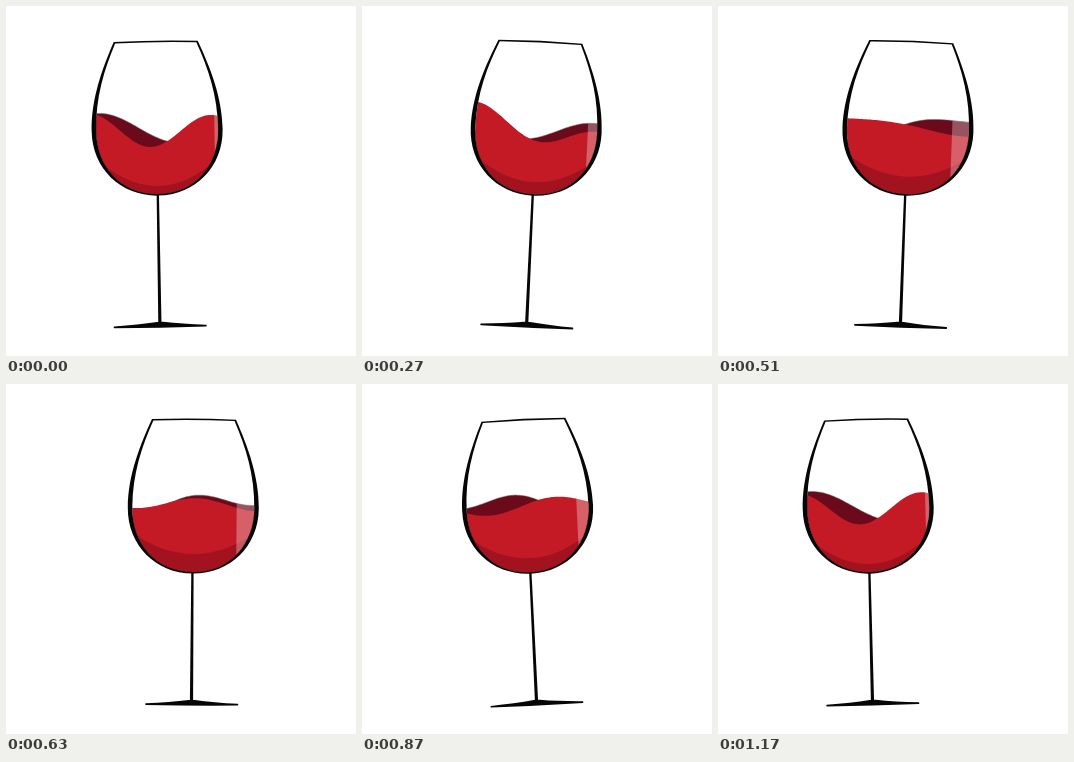
These frames come from a looping animation (350x350 px, 1200 ms). An HTML page:

```html
<!DOCTYPE html>
<html lang="en">
<head>
<meta charset="utf-8">
<title>Wine glass</title>
<style>
  html, body { margin: 0; width: 100%; height: 100%; overflow: hidden; background: #fff; }
  svg { display: block; width: 100vw; height: 100vh; }
</style>
</head>
<body>
<svg viewBox="0 0 350 350">
  <defs>
    <clipPath id="bowl"><path class="tilt" d="M-40.5-280C-52-254-61-227-61-193C-61-157-37-129-0-129C37-129 61-157 61-193C61-227 52-254 40.5-280Z"/></clipPath>
    <clipPath id="wine"><path class="back"/><path class="front"/></clipPath>
  </defs>
  <g clip-path="url(#bowl)">
    <path class="back" fill="#6a0a1b" stroke="#777" stroke-width=".5"/>
    <path class="front" fill="#c41a26"/>
    <g class="tilt"><path id="shade" fill="#a2131f"/></g>
    <g clip-path="url(#wine)">
      <g class="tilt"><path id="shine" fill="#fff" fill-opacity=".3"/></g>
    </g>
  </g>
  <g class="tilt" fill="#060607">
    <path fill-rule="evenodd" d="M-42-281.6C-54-255-65.5-225-65.5-193C-65.5-155-37-127.4 0-127.4C37-127.4 65.5-155 65.5-193C65.5-225 54-255 42-281.6Q0-283.4-42-281.6ZM-40.6-280.2Q0-281.8 40.6-280.2C52-254 61-227 61-193C61-157 37-129 0-129C-37-129-61-157-61-193C-61-227-52-254-40.6-280.2Z"/>
    <path d="M-1.5-129H.8L1.3 1H-1.9Z"/>
    <path d="M-46 2.7Q-22 1.4-3-1.1H3Q22 1.4 46 2.4Q47.3 3.3 46 4.2Q0 4.9-46 4.4Q-47.5 3.6-46 2.7Z"/>
  </g>
</svg>
<script>
const LOOP = 1200, STEP = 30, LEVEL = 100, REACH = 61;

const setAll = (s, name, value) =>
  document.querySelectorAll(s).forEach(el => el.setAttribute(name, value));

// Periodic value around a mean, highest at time `peak`
const sway = (t, mean, amp, peak) => mean + amp * Math.cos((t - peak) / LOOP * 2 * Math.PI);
const flutter = (t, amp) => sway(2 * t, 0, amp, 60);

// A surface is level + slope + hump + ripple, each swaying on its own
const frontWave = t => ({
  level: sway(t, 22.3, 2.4, 20),
  slope: sway(t, 3.5, 11, 325) - flutter(t, 1.5),
  hump: sway(t, 5.2, 11.5, 95),
  ripple: sway(t, -3.5, 3, 480)
});
const backWave = t => ({
  level: sway(t, 23, 4.5, 130),
  slope: sway(t, 1.5, 11, -80) + flutter(t, 2.5),
  hump: sway(t, -0.9, 8, 140),
  ripple: sway(t, 0.6, 3.2, 950)
});

function wavePath(wave, cx) {
  let d = '';
  for (let x = -70; x <= 70; x += 2) {
    const a = x / REACH * Math.PI;
    const y = LEVEL + wave.level + wave.slope * Math.sin(a / 2) +
      wave.hump * Math.cos(a) + wave.ripple * Math.sin(a);
    d += `${d ? 'L' : 'M'}${cx + x} ${y}`;
  }
  return `${d}V200H${cx - 70}Z`;
}

function draw(t) {
  const x = sway(t, 169.9, -15.9, 30);
  const tilt = sway(t, 0, 3.05, 358);
  const cx = x + 193 * Math.sin(tilt * Math.PI / 180);
  setAll('.tilt', 'transform', `translate(${x} 317) rotate(${tilt})`);
  setAll('.front', 'd', wavePath(frontWave(t), cx));
  setAll('.back', 'd', wavePath(backWave(t), cx));

  const low = sway(t, -142, 5, 5), rise = sway(t, 32, 4.5, 5);
  shade.setAttribute('d', `M-70 ${low - rise}Q0 ${low + rise} 70 ${low - rise}V-120H-70Z`);
  const edge = sway(t, 50.3, 7, 5);
  shine.setAttribute('d', `M${edge} -230H70V-130H${edge}Z`);
}

const start = performance.now();
function tick() {
  const t = (performance.now() - start) % LOOP;
  draw(Math.floor(t / STEP) * STEP);
  requestAnimationFrame(tick);
}
draw(0);
requestAnimationFrame(tick);
</script>
</body>
</html>
```
